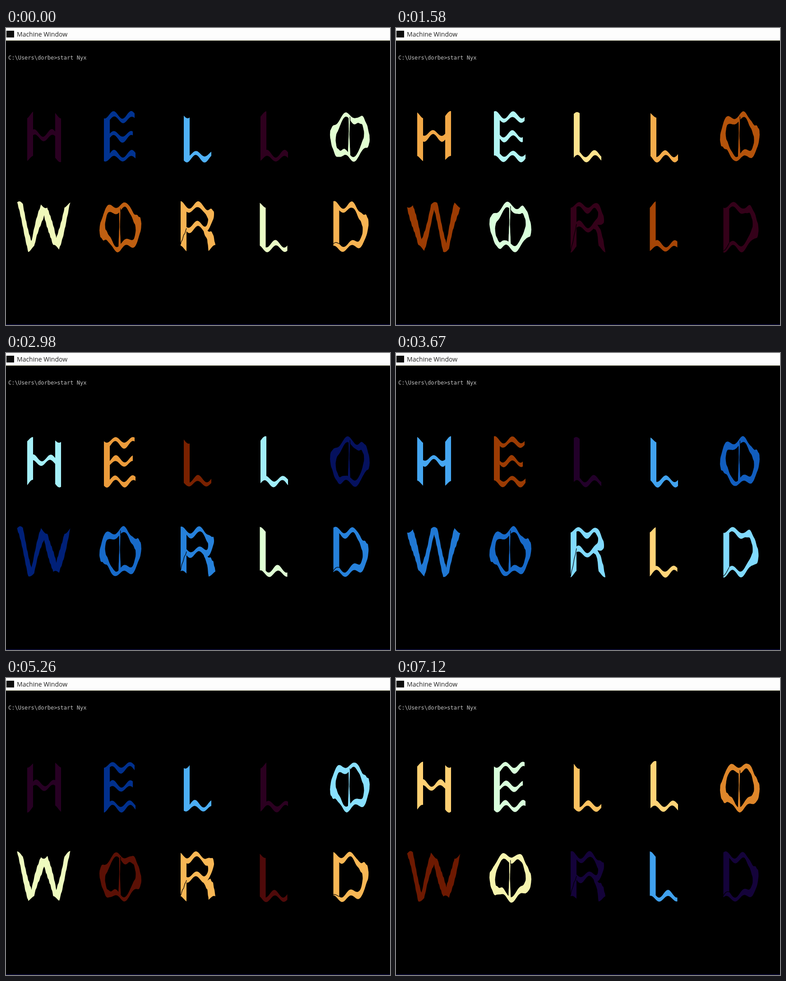
These frames come from a looping animation (851x658 px, 7.17 s). An HTML page:

```html
<!DOCTYPE html>
<html lang="en">
<head>
<meta charset="utf-8">
<title>Wavy hello world</title>
<style>
  html, body { margin: 0; width: 100%; height: 100%; overflow: hidden; background: #000; }
  svg { display: block; width: 100%; height: 100%; }
  .title { font: 14px "Open Sans", "Noto Sans", sans-serif; fill: #222; }
  .prompt { font: 12px "DejaVu Sans Mono", "Liberation Mono", monospace; fill: #c4c4c4; white-space: pre; }
</style>
</head>
<body>
<svg id="stage" viewBox="0 0 851 658" xmlns="http://www.w3.org/2000/svg">
  <rect width="851" height="658" fill="#000"/>
  <rect width="851" height="27" fill="#fdfdfd"/>
  <rect y="27" width="851" height="1" fill="#d8d8b8"/>
  <rect x="1" y="6" width="17" height="15" fill="#0c0c0c"/>
  <text class="title" x="24" y="19">Machine Window</text>
  <text class="prompt" x="5" y="70">C:\Users\dorbe&gt;start Nyx</text>
  <rect y="656" width="851" height="2" fill="#0a0a30"/>
</svg>
<script>
const LOOP = 7170, STEPS = 154;
const WAVELENGTH = 39, WAVE_SPEED = 38, AMPLITUDE = 7.5;
const HUE_SPEED = 68.7, TAU = Math.PI * 2;

function arc(cx, cy, rx, ry, from, to) {
  const n = 40;
  return Array.from({ length: n + 1 }, (_, i) => {
    const a = (from + (to - from) * i / n) * TAU;
    return [cx + rx * Math.cos(a), cy + ry * Math.sin(a)];
  });
}

// "x,y x,y" to a list of points
const pts = text => text.split(" ").map(p => p.split(",").map(Number));

function ring(width) {
  const cx = width * 0.48, mid = width / 2;
  return {
    contours: [
      arc(mid, 48.5, mid, 49, 0, 1),
      arc(mid, 48.5, mid - 12.5, 38, 1, 0),
      [[cx - 1, 9], [cx + 2, 9], [cx + 0.5, 55], [cx - 0.3, 55]],
      [[cx - 0.4, 36], [cx + 0.4, 36], [cx + 2.8, 88], [cx - 2.5, 88]]
    ],
    slit: [[cx + 2, 5], [cx + 2.5, 14]]
  };
}

const glyphs = {
  H: { contours: [pts("0,0 13,0 13,40 62,40 62,0 75,0 75,97 62,97 62,51 13,51 13,97 0,97")] },
  E: { contours: [pts("0,0 68,0 68,11 13,11 13,42 64,42 64,53 13,53 13,86 70,86 70,97 0,97")] },
  L: { contours: [pts("0,0 13,0 13,86 61,86 61,97 0,97")] },
  W: { contours: [pts("0,0 13,0 32,79 53,0 67,0 87,79 105,0 118,0 93,97 80,97 60,17 38,97 25,97")] },
  R: {
    contours: [
      [[0, 0], ...arc(46, 27, 28, 27, -0.25, 0.17),
       ...pts("66,56 72,70 77,97 62,97 59,70 51,55 13,54 13,97 0,97")],
      [[13, 11], [13, 43], ...arc(46, 27, 15, 16, 0.25, -0.25)]
    ],
    slit: [[0, 95], [13, 48]]
  },
  D: {
    contours: [
      [[0, 0], ...arc(33, 48.5, 45, 48.5, -0.25, 0.25), [0, 97]],
      [[13, 11], [13, 86], ...arc(32, 48.5, 33, 37.5, 0.25, -0.25)]
    ],
    slit: [[0, 94], [13, 86]]
  },
  O: ring(88),
  Q: ring(93)
};

// hue in degrees, dir of travel, crest of the wave in px; after "at" the letter runs "lag" seconds late
const letters = [
  { glyph: "H", x: 47, row: 0, hue: 228, dir: 1, crest: 16 },
  { glyph: "E", x: 217, row: 0, hue: 172, dir: -1, crest: 22 },
  { glyph: "L", x: 394, row: 0, hue: 112, dir: -1, crest: 27 },
  { glyph: "L", x: 564, row: 0, hue: 230, dir: 1, crest: 14 },
  { glyph: "O", x: 718, row: 0, hue: 40, dir: -1, crest: 34, lag: 0.64, at: 5.2 },
  { glyph: "W", x: 24.5, row: 1, hue: 28, dir: -1, crest: 4 },
  { glyph: "Q", x: 207, row: 1, hue: 300, dir: 1, crest: 19, lag: 0.65, at: 3 },
  { glyph: "R", x: 387, row: 1, hue: -21, dir: -1, crest: 38 },
  { glyph: "L", x: 562.5, row: 1, hue: 33, dir: -1, crest: 35, lag: 3.1, at: 1.6 },
  { glyph: "D", x: 725.5, row: 1, hue: -21, dir: -1, crest: 41 }
];

function subdivide(points, closed) {
  const out = [];
  points.forEach(([x, y], i) => {
    const next = points[i + 1] || (closed ? points[0] : null);
    if (!next) { out.push([x, y]); return; }
    const n = Math.max(1, Math.ceil(Math.hypot(next[0] - x, next[1] - y) / 3));
    for (let k = 0; k < n; k++) {
      out.push([x + (next[0] - x) * k / n, y + (next[1] - y) * k / n]);
    }
  });
  return out;
}

for (const shape of Object.values(glyphs)) {
  shape.contours = shape.contours.map(c => subdivide(c, true));
  if (shape.slit) shape.slit = subdivide(shape.slit, false);
}

const stage = document.getElementById("stage");

function addPath(attributes) {
  const path = document.createElementNS("http://www.w3.org/2000/svg", "path");
  for (const [key, value] of Object.entries(attributes)) path.setAttribute(key, value);
  return stage.appendChild(path);
}

for (const letter of letters) {
  letter.shape = glyphs[letter.glyph];
  letter.body = addPath({});
  if (letter.shape.slit) letter.cut = addPath({ fill: "none", stroke: "#000", "stroke-width": 1.2 });
}

function colour(hue) {
  const channel = lag => Math.round(127.5 + 127.5 * Math.cos((hue - lag) * TAU / 360));
  return `rgb(${channel(0)},${channel(45)},${channel(90)})`;
}

function outline(points, letter, travel) {
  const top = letter.row ? 392 : 192.5;
  const crest = letter.crest + WAVE_SPEED * travel;
  const ripple = letter.hue - 9 * travel;
  return "M" + points.map(([x, y]) => {
    const dy = -AMPLITUDE * Math.cos((x - crest) * TAU / WAVELENGTH)
      + 1.3 * Math.sin(x * 0.15 + y * 0.35 + ripple);
    return (letter.x + x).toFixed(1) + " " + (top + y + dy).toFixed(1);
  }).join("L");
}

function draw(t) {
  for (const letter of letters) {
    const { shape, body, cut, hue, dir, lag = 0, at = 0 } = letter;
    const travel = dir * (t > at ? t - lag : t);
    body.setAttribute("fill", colour(hue + HUE_SPEED * travel));
    body.setAttribute("d", shape.contours.map(c => outline(c, letter, travel) + "Z").join(""));
    if (cut) cut.setAttribute("d", outline(shape.slit, letter, travel));
  }
}

const start = performance.now();
function tick() {
  const step = Math.floor((performance.now() - start) % LOOP / LOOP * STEPS);
  draw(step * LOOP / STEPS / 1000);
  requestAnimationFrame(tick);
}
tick();
</script>
</body>
</html>
```
